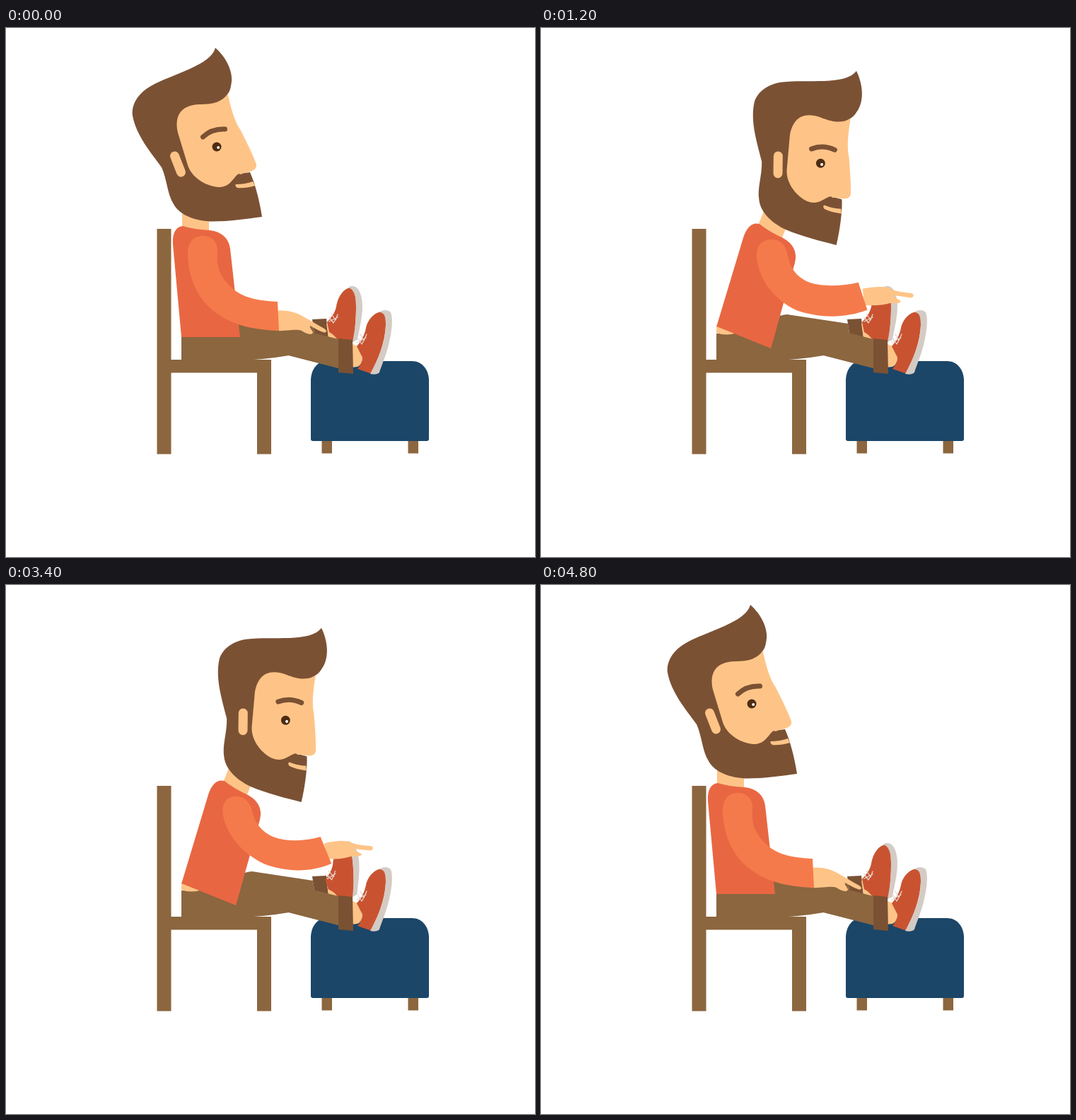
An HTML page with a canvas for the animation above (5000 ms loop, 748 by 748 pixels).

```html
<!DOCTYPE html>
<html lang="en">
<head>
<meta charset="utf-8">
<title>Seated stretch</title>
<style>
html, body { margin: 0; width: 100%; height: 100%; overflow: hidden; background: #fff; }
canvas { display: block; width: 100vw; height: 100vh; }
</style>
</head>
<body>
<canvas id="stage" width="748" height="748"></canvas>
<script>
const ctx = document.getElementById('stage').getContext('2d');
const LOOP = 5000, STEP = 40, RAD = Math.PI / 180;
const HIP = [287, 430], SHOULDER = [278, 314], HEEL = [460, 443];
const LEAN = 22, REACH = -39, FLEX = -15;

const C = {
  wood: '#8c663e', pants: '#8b663f', cuff: '#7a5133', hair: '#7b5134',
  skin: '#fec487', shirt: '#e86742', sleeve: '#f57a4b', shoe: '#c95331',
  sole: '#d4cbc4', lace: '#e6d5cd', blue: '#1b4668', eye: '#4e2c12'
};

// Arm outlines: resting, reaching and pulling
const SLEEVE = [
  'M257 320C257 303 265 294 279 294C294 295 300 305 299 318C297 338 303 352 320 368C335 382 360 386 384 387L386 428C355 427 322 422 296 402C272 384 258 355 257 320Z',
  'M305 323C304 308 313 299 326 299C340 299 347 310 349 322C352 338 360 350 376 358C395 366 425 365 449 359L462 398C430 410 395 410 362 399C332 386 307 355 305 323Z',
  'M309 319C308 306 315 299 325 299C338 299 344 309 348 321C354 337 366 348 382 353C400 359 420 358 437 351L457 387C430 401 400 400 370 386C340 370 313 345 309 319Z'
];
const HAND = [
  'M382 400C400 398 412 403 422 409C432 414 440 420 450 425C455 428 453 432 448 430C442 428 436 424 430 421C428 423 434 428 434 431C432 435 424 432 418 428C408 425 398 429 382 428Z',
  'M455 368C475 364 490 364 497 369C505 372 515 373 525 374C529 376 527 381 522 380C514 379 506 378 499 377C498 380 506 382 509 385C509 389 500 388 494 388C484 391 473 392 458 391Z',
  'M440 361C455 354 466 355 475 357C485 359 492 360 502 361C506 363 504 368 499 367C492 367 486 366 480 366C480 369 487 370 492 372C493 376 484 377 478 376C470 378 463 381 451 381Z'
];

function turn([x, y], [cx, cy], deg) {
  const c = Math.cos(deg * RAD), s = Math.sin(deg * RAD);
  return [cx + (x - cx) * c - (y - cy) * s, cy + (x - cx) * s + (y - cy) * c];
}

// Coordinates of an outline in the arm's own frame
function localise(d, lean, reach) {
  const n = d.match(/\d+/g).map(Number);
  const [sx, sy] = turn(SHOULDER, HIP, lean);
  const out = [];
  for (let i = 0; i < n.length; i += 2) {
    out.push(...turn([n[i] - sx, n[i + 1] - sy], [0, 0], -lean - reach));
  }
  return out;
}

function limb(poses) {
  const [rest, out, pulled] = poses.map((d, i) => localise(d, i && LEAN, i && REACH));
  return (reach, pull) => {
    let i = 0;
    return poses[0].replace(/\d+/g, () => {
      const far = out[i] + (pulled[i] - out[i]) * pull;
      const v = rest[i] + (far - rest[i]) * reach;
      i++;
      return v.toFixed(2);
    });
  };
}
const sleevePath = limb(SLEEVE), handPath = limb(HAND);

function ease(t, from, to) {
  const p = Math.min(1, Math.max(0, (t - from) / (to - from)));
  return p * p * (3 - 2 * p);
}

function fill(d, color) {
  ctx.fillStyle = color;
  ctx.fill(new Path2D(d));
}

function line(d, color, width) {
  ctx.strokeStyle = color;
  ctx.lineWidth = width;
  ctx.lineCap = ctx.lineJoin = 'round';
  ctx.stroke(new Path2D(d));
}

function dot(x, y, r, color) {
  ctx.fillStyle = color;
  ctx.beginPath();
  ctx.arc(x, y, r, 0, 2 * Math.PI);
  ctx.fill();
}

function rect(x, y, w, h, color) {
  ctx.fillStyle = color;
  ctx.fillRect(x, y, w, h);
}

function rotated([x, y], deg, draw) {
  ctx.save();
  ctx.translate(x, y);
  ctx.rotate(deg * RAD);
  ctx.translate(-x, -y);
  draw();
  ctx.restore();
}

function furniture() {
  rect(213.5, 284, 20, 318.5, C.wood);
  rect(233, 469, 142, 18.5, C.wood);
  rect(355, 487, 20, 115.5, C.wood);
  rect(446.5, 583, 14.5, 18.5, C.wood);
  rect(568.5, 583, 14.5, 18.5, C.wood);
  fill('M431 497C432 482 440 471 454 471H574C588 471 597 482 598 497V581Q598 584 595 584H434Q431 584 431 581Z', C.blue);
}

function farShoe() {
  fill('M488 367C476 368 469 382 467 394C465 404 459 410 454 416L457 430Q465 434 470 443L491 444C494 425 495 410 495 395C495 382 494 370 488 367Z', C.shoe);
  fill('M484 367C488 363 495 364 499 371C505 382 505 397 502 414C500 426 498 434 497 441L490 444C494 425 495 410 495 392C495 380 492 369 484 367Z', C.sole);
  line('M460 404L466 413L469 405M457 409L463 417L467 410M457 415L469 409', C.lace, 1.3);
}

function nearShoe() {
  fill('M533 401C522 401 512 411 509 424C507 434 503 442 496 450L504 466Q504 474 497 482L517 489C526 468 536 445 537 420C537 408 537 402 533 401Z', C.shoe);
  fill('M528 402C532 398 540 398 544 402C548 412 545 432 541 448C537 464 531 477 528 487Q524 491 515 489C526 468 537 444 537 420C537 408 535 402 528 402Z', C.sole);
  line('M501 433L506 442L510 433M498 439L503 447L507 440M496 445L509 438', C.lace, 1.3);
}

function legs(pull) {
  fill('M248 432L300 432L325 412Q340 405 348 405L434 418L436 432L470 440V481L400 463Q365 469 330 470L248 471Z', C.pants);
  fill('M433 412L453 411L456 438L436 432Z', C.cuff);
  fill('M453 418L466 426L472 444L456 438Z', C.skin);
  rotated(HEEL, FLEX * pull, farShoe);
  fill('M400 422L470 440V481L400 463Z', C.pants);
  fill('M488 446L497 450L504 466Q504 476 497 479L488 480Z', C.skin);
  nearShoe();
  fill('M470 439L490 441L491 489L470 487Z', C.cuff);
  fill('M248 420L277 431Q262 436 248 431Z', C.skin);
}

function head(brow) {
  fill('M296 28C312 42 323 64 318 82Q317 89 313 94L330 206L345 204C352 219 359 246 362 267C340 270 312 274 288 273.5C262 272 244 262 237 249C228 235 228 215 220 197C205 176 184 152 179 124C177 108 187 92 205 82C235 65 290 53 296 28Z', C.hair);
  fill('M313.5 93C318 113 323 132 332 145C340 161 350 181 354 193Q355 199 348 202Q342 204 335 205.5L332 207Q329 205 326 208.5C318 217 315 225 300 225C280 223 262 210 257 194L243 148C238 125 246 109 274 108C294 108 306 104 313.5 93Z', C.skin);
  fill('M325 221Q338 221 349 217L352 223Q338 227 327 226Q323 223 325 221Z', C.skin);
  line('M238.5 181L247.5 204', C.skin, 13);
  dot(298, 168, 6.5, C.eye);
  dot(300.2, 169, 2, '#fff');
  ctx.translate(0, -6.3 * brow);
  line('M278.5 154Q291 142 309.5 143', C.hair, 7);
}

function body(brow) {
  fill('M249 250H287V292H249Z', C.skin);
  fill('M250 280Q266 285 288 286C305 288 315 297 317 312L324 375L331 437H248L236 306C235 290 240 281 250 280Z', C.shirt);
  head(brow);
}

function arm(lean, reach, pull) {
  ctx.save();
  ctx.translate(...turn(SHOULDER, HIP, lean));
  ctx.rotate((lean + REACH * reach) * RAD);
  fill(handPath(reach, pull), C.skin);
  fill(sleevePath(reach, pull), C.sleeve);
  ctx.restore();
}

function render(t) {
  const lean = LEAN * (ease(t, 360, 1080) - ease(t, 3466, 4186));
  const back = ease(t, 3633, 4355);
  const reach = ease(t, 360, 1250) - back;
  const pull = ease(t, 1600, 2500) - ease(t, 2640, 3920);
  const brow = ease(t, 1640, 2440) - back;

  rect(0, 0, 748, 748, '#fff');
  furniture();
  legs(pull);
  rotated(HIP, lean, () => body(brow));
  arm(lean, reach, pull);
}

const start = performance.now();
function tick() {
  const t = (performance.now() - start) % LOOP;
  render(Math.floor(t / STEP) * STEP);
  requestAnimationFrame(tick);
}
tick();
</script>
</body>
</html>
```
